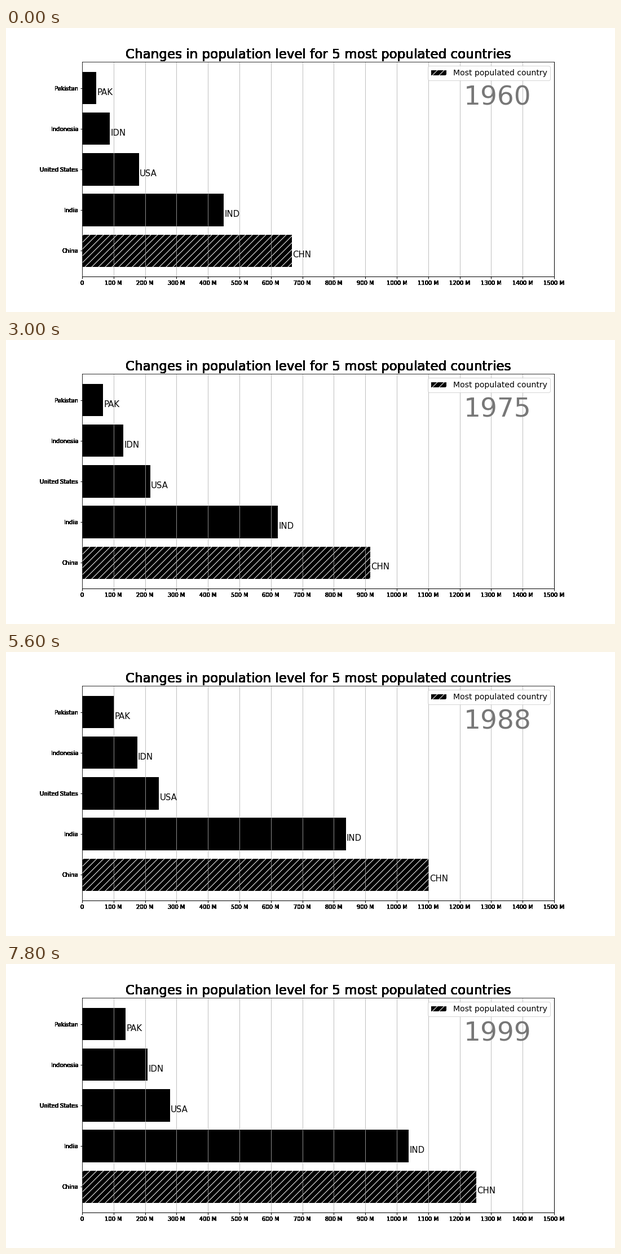
Recreate the animation shown at these times as a matplotlib script. Size 1080 by 504 pixels, loop 8 s.

```python
import math

import matplotlib.pyplot as plt
from matplotlib.animation import FuncAnimation

FIRST, YEARS = 1960, 40
INK_LAYERS = 24  # stacked text outside the axes looks heavy and jagged

# Bottom bar first: name, code, early surplus that fades away, and
# key populations in millions, evenly spaced over the whole period
COUNTRIES = [
    ("China", "CHN", 38.6,
     [628.5, 713, 813, 910, 975, 1042, 1122.7, 1192, 1252.7]),
    ("India", "IND", 0, [450.5, 552, 691, 860.2, 1038.1]),
    ("United States", "USA", 0, [180.7, 204.5, 226.1, 247.5, 279]),
    ("Indonesia", "IDN", 0, [87.8, 114.1, 145.7, 179, 208.6]),
    ("Pakistan", "PAK", 0, [44.9, 57.7, 76.9, 105.2, 138.6]),
]


def smooth(keys, progress):
    """Catmull-Rom curve through evenly spaced keys, progress from 0 to 1."""
    pos = progress * (len(keys) - 1)
    i = min(int(pos), len(keys) - 2)
    u = pos - i
    before = 3 * (keys[0] - keys[1]) + keys[2]
    after = 3 * (keys[-1] - keys[-2]) + keys[-3]
    a, b, c, d = [before, *keys, after][i:i + 4]
    return b + u / 2 * (c - a + u * (2 * a - 5 * b + 4 * c - d
                                     + u * (3 * (b - c) + d - a)))


def population(year, surplus, keys):
    t = year - FIRST
    return smooth(keys, t / (YEARS - 1)) + surplus * math.exp(-t)


plt.rcParams["font.family"] = "DejaVu Sans"
fig = plt.figure(figsize=(15, 7), dpi=72, facecolor="white")
fig.subplots_adjust(left=0.125, right=0.9, bottom=0.125, top=0.88)
ax = fig.add_subplot()

rows = range(len(COUNTRIES))
ticks = range(0, 1501, 100)
ax.set(xlim=(0, 1500), ylim=(-0.64, 4.64), xticks=ticks, yticks=rows)
ax.tick_params(labelbottom=False, labelleft=False, width=1)
ax.grid(axis="x", color="#b0b0b0", linewidth=0.8)
ax.spines[["bottom", "right"]].set_linewidth(1)


def heavy_text(*args, **kwargs):
    for _ in range(INK_LAYERS):
        ax.text(*args, color="black", **kwargs)


x_trans, x_va, x_ha = ax.get_xaxis_text1_transform(7)
y_trans, y_va, y_ha = ax.get_yaxis_text1_transform(7)
for t in ticks:
    heavy_text(t, 0, f"{t} M" if t else "0", transform=x_trans,
               va=x_va, ha=x_ha, fontsize=10)
for i, (name, *_) in enumerate(COUNTRIES):
    heavy_text(0, i, name, transform=y_trans, va=y_va, ha=y_ha, fontsize=10)
heavy_text(0.5125, 0.88 + 6 / 504,
           "Changes in population level for 5 most populated countries",
           transform=fig.transFigure, ha="center", fontsize=23)

bars = ax.barh(rows, [1] * len(rows), height=0.8, color="black", linewidth=0)
bars[0].set(edgecolor="white", linewidth=1, hatch="//")
codes = [ax.text(0, i - 0.175, code, fontsize=15)
         for i, (_, code, *_) in enumerate(COUNTRIES)]
year_text = ax.text(0.809, 0.8, "", transform=ax.transAxes,
                    fontsize=47, color="#777777")
ax.legend([bars[0]], ["Most populated country"], loc="upper right", fontsize=14)


def update(frame):
    year = FIRST + frame
    for bar, code, (_, _, surplus, keys) in zip(bars, codes, COUNTRIES):
        width = population(year, surplus, keys)
        bar.set_width(width)
        code.set_x(width + 2)
    year_text.set_text(str(year))
    return [*bars, *codes, year_text]


anim = FuncAnimation(fig, update, frames=YEARS, interval=200,
                     repeat=True, repeat_delay=0)
plt.show()
```
